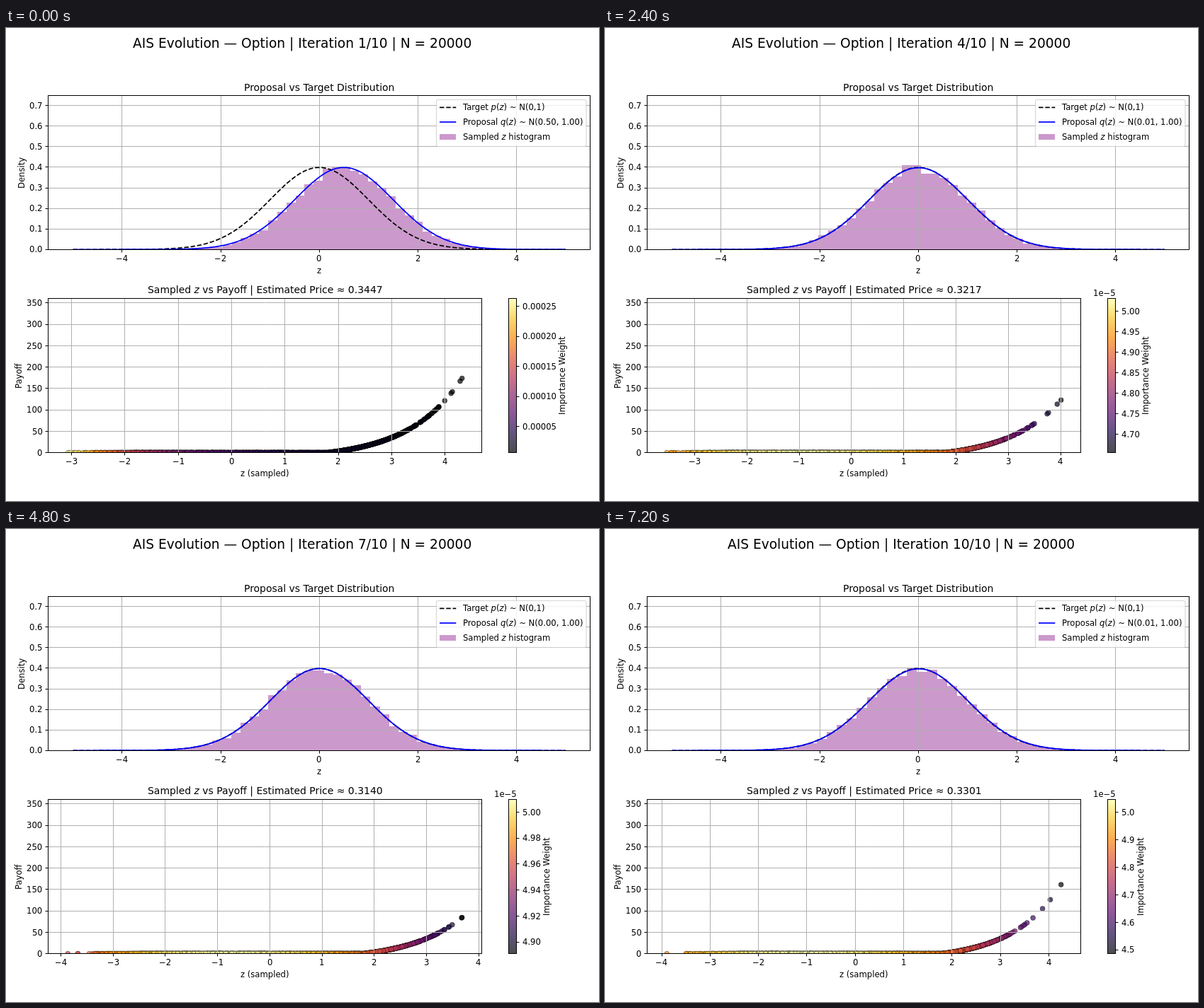
Recreate the animation shown at these times as an HTML page with a canvas. Size 837 by 669 pixels, loop 8 s.

```html
<!DOCTYPE html>
<html lang="en">
<head>
<meta charset="utf-8">
<title>Sampling evolution</title>
<style>
html, body { margin: 0; width: 100%; height: 100%; overflow: hidden; background: #fff; }
canvas { display: block; }
</style>
</head>
<body>
<canvas id="stage" width="837" height="669"></canvas>
<script>
const ctx = document.getElementById('stage').getContext('2d');
const STEP_MS = 800, SAMPLES = 20000, BINS = 40;
const FONT = '"DejaVu Sans", sans-serif';
const SMALL = 11.62, MEDIUM = 13.95, LARGE = 18.6;
const TOP = { left: 59.5, right: 824.5, top: 95.5, bottom: 313.5 };
const LOW = { left: 59.5, right: 671.5, top: 382.5, bottom: 600.5 };
const BAR = { left: 709.5, right: 720.5, top: 382.5, bottom: 600.5 };
const GRID = '#b0b0b0', MAUVE = '#cc99cc', DASH = [6.45, 2.79];

// Each iteration: proposal mean and deviation, sample range, estimated price.
const runs = [
  { mean: 0.5, sd: 1, lo: -3.07, hi: 4.32, price: '0.3447' },
  { mean: 0.0118, sd: 0.9998, lo: -3.634, hi: 3.827, price: '0.3273' },
  { mean: 0.002, sd: 0.9945, lo: -3.696, hi: 3.9, price: '0.3296' },
  { mean: 0.0063, sd: 1.0031, lo: -3.53, hi: 4.008, price: '0.3217' },
  { mean: -0.0055, sd: 1.0028, lo: -4.097, hi: 3.936, price: '0.3338' },
  { mean: 0.003, sd: 1.002, lo: -3.55, hi: 4.1, price: '0.3285' },
  { mean: 0.0019, sd: 1.0012, lo: -3.867, hi: 3.682, price: '0.3140' },
  { mean: 0.006, sd: 1.002, lo: -3.685, hi: 3.85, price: '0.3262' },
  { mean: -0.0155, sd: 0.9986, lo: -3.772, hi: 3.777, price: '0.3467' },
  { mean: 0.0092, sd: 1.0041, lo: -3.893, hi: 4.252, price: '0.3301' }
];

const inferno = ['#000004', '#1f0c48', '#57106e', '#88226a', '#bc3754', '#e35933', '#f98e09', '#f9c932', '#fcffa4']
  .map(hex => [1, 3, 5].map(i => parseInt(hex.slice(i, i + 2), 16)));

function heat(t) {
  const p = Math.min(0.99999, Math.max(0, t)) * 8, i = Math.floor(p);
  const rgb = inferno[i].map((c, k) => Math.round(c + (inferno[i + 1][k] - c) * (p - i)));
  return `rgba(${rgb},0.7)`;
}

function seeded(seed) {
  return () => {
    seed = (seed + 0x6D2B79F5) | 0;
    let t = Math.imul(seed ^ (seed >>> 15), 1 | seed);
    t = (t + Math.imul(t ^ (t >>> 7), 61 | t)) ^ t;
    return ((t ^ (t >>> 14)) >>> 0) / 4294967296;
  };
}

const density = (z, mean = 0, sd = 1) => Math.exp(-(((z - mean) / sd) ** 2) / 2) / (sd * Math.sqrt(2 * Math.PI));
const payoff = z => Math.max(0, 15.2 * (Math.exp(z - 1.8) - 1));
const range = (from, to) => Array.from({ length: to - from + 1 }, (_, i) => from + i);
const snap = v => Math.floor(v) + 0.5;
const signed = n => String(n).replace('-', '\u2212');
const topX = z => 442.15 + z * 69.55;
const topY = d => 313.25 - d * 290.7;
const lowY = v => 600.7 - v * 0.6056;

function drawSamples({ mean, sd, lo, hi }, random) {
  const samples = [lo, hi];
  while (samples.length < SAMPLES) {
    const radius = Math.sqrt(-2 * Math.log(1 - random()));
    const z = mean + sd * radius * Math.cos(2 * Math.PI * random());
    if (z > lo && z < hi) samples.push(z);
  }
  return samples;
}

function setFont(size, italic) {
  ctx.font = `${italic ? 'italic ' : ''}${size}px ${FONT}`;
}

// Parts between asterisks are italic.
function measure(str, size = SMALL) {
  return str.split('*').reduce((w, part, i) => {
    setFont(size, i % 2);
    return w + ctx.measureText(part).width;
  }, 0);
}

function text(str, x, y, size = SMALL, align = 0.5) {
  x = Math.round(x - measure(str, size) * align);
  ctx.fillStyle = '#000';
  str.split('*').forEach((part, i) => {
    setFont(size, i % 2);
    ctx.fillText(part, x, Math.round(y));
    x += ctx.measureText(part).width;
  });
}

function sideText(str, x, y) {
  ctx.save();
  ctx.translate(Math.round(x), Math.round(y));
  ctx.rotate(-Math.PI / 2);
  text(str, 0, 0);
  ctx.restore();
}

function line(x1, y1, x2, y2, color = '#000', width = 1, dash = []) {
  ctx.strokeStyle = color;
  ctx.lineWidth = width;
  ctx.setLineDash(dash);
  ctx.beginPath();
  ctx.moveTo(x1, y1);
  ctx.lineTo(x2, y2);
  ctx.stroke();
  ctx.setLineDash([]);
}

function clipped(box, draw) {
  ctx.save();
  ctx.beginPath();
  ctx.rect(box.left, box.top, box.right - box.left, box.bottom - box.top);
  ctx.clip();
  draw();
  ctx.restore();
}

function grid(box, xs, ys) {
  for (const [x, label] of xs) {
    line(snap(x), box.top, snap(x), box.bottom, GRID);
    line(snap(x), box.bottom, snap(x), box.bottom + 4);
    text(label, x, box.bottom + 16.9);
  }
  for (const [y, label] of ys) {
    line(box.left, snap(y), box.right, snap(y), GRID);
    line(box.left - 4, snap(y), box.left, snap(y));
    text(label, 51.4, y + 4.2, SMALL, 1);
  }
}

function frame(box) {
  ctx.strokeStyle = '#000';
  ctx.lineWidth = 1;
  ctx.strokeRect(box.left, box.top, box.right - box.left, box.bottom - box.top);
}

function bell(mean, sd, color, dash) {
  ctx.strokeStyle = color;
  ctx.lineWidth = 1.74;
  ctx.setLineDash(dash);
  ctx.beginPath();
  for (let z = -5; z <= 5.001; z += 0.02) ctx.lineTo(topX(z), topY(density(z, mean, sd)));
  ctx.stroke();
  ctx.setLineDash([]);
}

function histogram(samples, lo, hi) {
  const width = (hi - lo) / BINS;
  const counts = Array(BINS).fill(0);
  for (const z of samples) counts[Math.min(BINS - 1, Math.floor((z - lo) / width))]++;
  ctx.fillStyle = MAUVE;
  counts.forEach((count, i) => {
    const z = lo + i * width;
    const x = Math.round(topX(z)), y = Math.round(topY(count / (SAMPLES * width)));
    ctx.fillRect(x, y, Math.round(topX(z + width)) - x, 313 - y);
  });
}

function legend({ mean, sd }) {
  const label = `Proposal *q*(*z*) ~ N(${mean.toFixed(2)}, ${sd.toFixed(2)})`;
  const x = 814 - measure(label), handle = x - 32.5, edge = snap(x - 37.2);
  ctx.beginPath();
  ctx.roundRect(edge, 101.5, 819 - edge, 66, 2.3);
  ctx.fillStyle = 'rgba(255,255,255,0.8)';
  ctx.fill();
  ctx.strokeStyle = 'rgba(204,204,204,0.8)';
  ctx.lineWidth = 1.16;
  ctx.stroke();
  line(handle, 112.3, handle + 23.2, 112.3, '#000', 1.74, DASH);
  line(handle, 133, handle + 23.2, 133, '#00f', 1.74);
  ctx.fillStyle = MAUVE;
  ctx.fillRect(Math.round(handle), 150, 23, 8);
  text('Target *p*(*z*) ~ N(0,1)', x, 116, SMALL, 0);
  text(label, x, 137, SMALL, 0);
  text('Sampled *z* histogram', x, 158, SMALL, 0);
}

// Crowded regions are thinned, since the points there cover each other.
function scatter(run, samples, lowX, scale, tone, random) {
  ctx.strokeStyle = 'rgba(0,0,0,0.7)';
  ctx.lineWidth = 0.5;
  for (const z of samples) {
    const perPixel = SAMPLES * density(z, run.mean, run.sd) / scale;
    if (random() * perPixel > 7) continue;
    ctx.beginPath();
    ctx.arc(lowX(z), lowY(payoff(z)), 3.49, 0, 7);
    ctx.fillStyle = heat(tone(z));
    ctx.fill();
    ctx.stroke();
  }
}

function niceStep(span) {
  const power = 10 ** Math.floor(Math.log10(span / 9));
  return [1, 2, 2.5, 5, 10].map(n => n * power).find(step => span / step <= 9);
}

// Weights are given in units of 1e-5.
function colorbar(min, max) {
  const shade = ctx.createLinearGradient(0, BAR.bottom, 0, BAR.top);
  for (let i = 0; i <= 8; i++) shade.addColorStop(i / 8, heat(i / 8));
  ctx.fillStyle = shade;
  ctx.fillRect(BAR.left, BAR.top, BAR.right - BAR.left, BAR.bottom - BAR.top);
  frame(BAR);
  const step = niceStep(max - min), plain = max > 10;
  const decimals = Math.max(0, -Math.floor(Math.log10(step) + 1e-9));
  let width = 0;
  for (let k = Math.ceil(min / step); k * step <= max; k++) {
    const y = BAR.bottom - (k * step - min) / (max - min) * (BAR.bottom - BAR.top);
    const label = plain ? (k * step / 1e5).toFixed(5) : (k * step).toFixed(decimals);
    line(BAR.right, snap(y), BAR.right + 4, snap(y));
    text(label, 729, y + 4.2, SMALL, 0);
    width = measure(label);
  }
  if (!plain) text('1e\u22125', 721, 379, SMALL, 1);
  sideText('Importance Weight', 729 + width + 12.3, 491.5);
}

function drawRun(index) {
  const run = runs[index], { mean, sd, lo, hi } = run;
  const random = seeded(index * 97 + 11);
  const samples = drawSamples(run, random);
  const weight = z => density(z) / density(z, mean, sd) / SAMPLES * 1e5;
  const weights = samples.map(weight);
  const min = Math.min(...weights), max = Math.max(...weights);
  const tone = z => (weight(z) - min) / (max - min);
  const scale = (LOW.right - LOW.left) / (1.1 * (hi - lo));
  const lowX = z => LOW.left + (z - lo + 0.05 * (hi - lo)) * scale;

  ctx.fillStyle = '#fff';
  ctx.fillRect(0, 0, 837, 669);
  text(`AIS Evolution — Option | Iteration ${index + 1}/10 | N = ${SAMPLES}`, 418.5, 27.7, LARGE);

  text('Proposal vs Target Distribution', 442, 89, MEDIUM);
  histogram(samples, lo, hi);
  grid(TOP, range(-2, 2).map(i => [topX(2 * i), signed(2 * i)]),
    range(0, 7).map(i => [topY(i / 10), (i / 10).toFixed(1)]));
  clipped(TOP, () => {
    bell(0, 1, '#000', DASH);
    bell(mean, sd, '#00f', []);
  });
  frame(TOP);
  legend(run);
  text('z', 442, 346.7);
  sideText('Density', 25.8, 205);

  text(`Sampled *z* vs Payoff | Estimated Price ≈ ${run.price}`, 365.8, 375.3, MEDIUM);
  clipped(LOW, () => scatter(run, samples, lowX, scale, tone, random));
  const ticks = range(-4, 4).map(z => [lowX(z), signed(z)]);
  grid(LOW, ticks.filter(([x]) => x >= LOW.left && x <= LOW.right),
    range(0, 7).map(i => [lowY(i * 50), String(i * 50)]));
  frame(LOW);
  text('z (sampled)', 365.5, 634);
  sideText('Payoff', 21.8, 491.5);
  colorbar(min, max);
}

let shown = -1;
const start = performance.now();
function tick(now) {
  const index = Math.floor(Math.max(0, now - start) / STEP_MS) % runs.length;
  if (index !== shown) drawRun(shown = index);
  requestAnimationFrame(tick);
}
tick(start);
</script>
</body>
</html>
```
